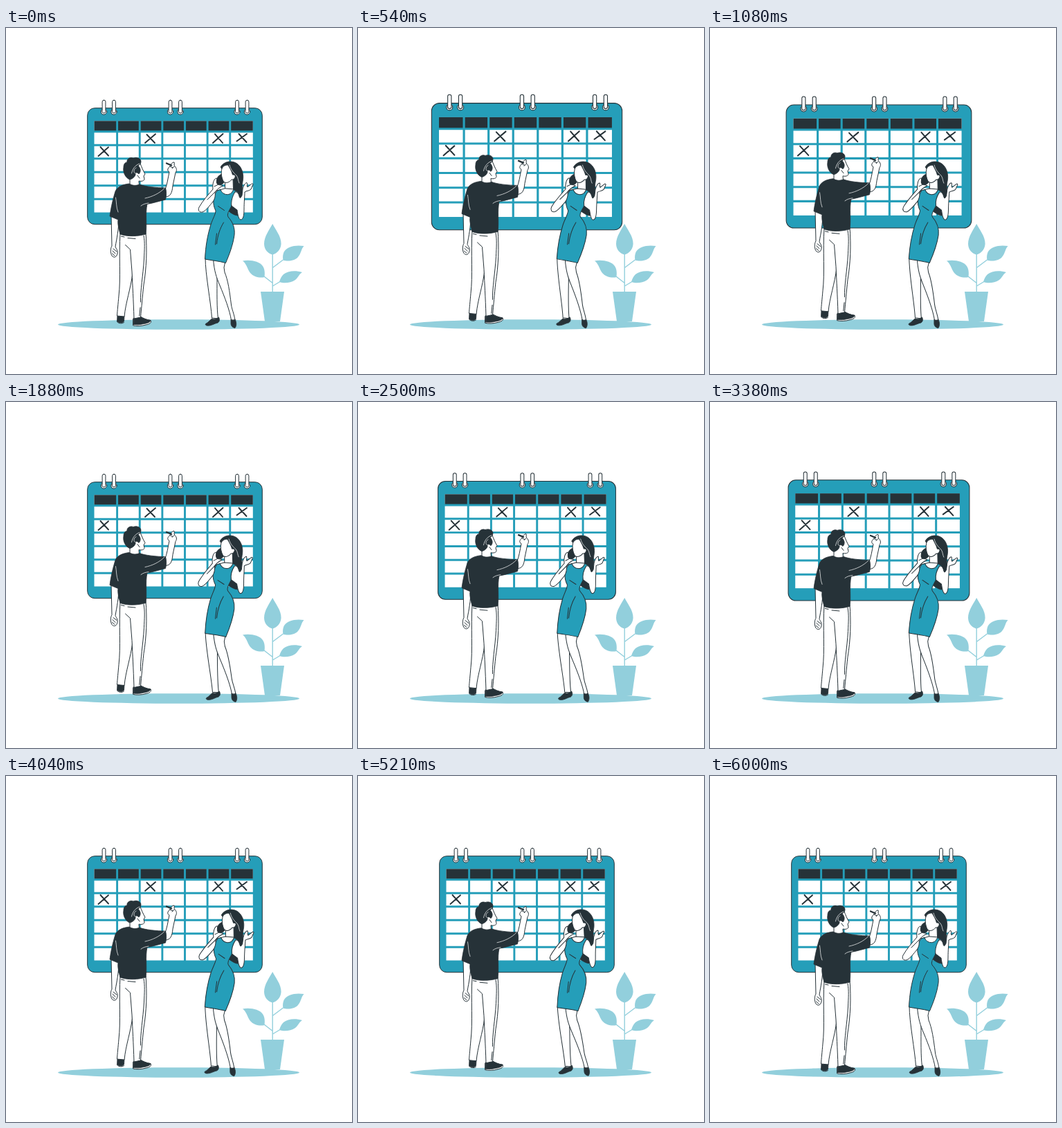
An HTML page for the animation above (6.04 s loop, 500 by 500 pixels).

```html
<!DOCTYPE html>
<html lang="en">
<head>
<meta charset="utf-8">
<title>Planning calendar</title>
<style>
  html, body { margin: 0; width: 100%; height: 100%; overflow: hidden; background: #fff; }
  svg { display: block; width: 100vw; height: 100vh; }
  .line { fill: none; stroke: #263238; stroke-width: 1; stroke-linecap: round; stroke-linejoin: round; }
  .skin { fill: #fff; stroke: #263238; stroke-width: 1; stroke-linecap: round; stroke-linejoin: round; }
  .dark { fill: #263238; stroke: #263238; stroke-width: .8; stroke-linejoin: round; }
  .teal { fill: #259eb9; stroke: #263238; stroke-width: 1; stroke-linejoin: round; }
  .light { fill: none; stroke: #fff; stroke-width: .7; stroke-linecap: round; }
  .plant { fill: #92cfdc; }
  .stem { fill: none; stroke: #92cfdc; stroke-width: 1.4; }
  .grid { fill: none; stroke: #259eb9; stroke-width: 2.9; }
  .mark { fill: none; stroke: #263238; stroke-width: 1.9; stroke-linecap: round; }
</style>
</head>
<body>
<svg viewBox="0 0 500 500">
  <ellipse class="plant" cx="249.5" cy="428.5" rx="174.5" ry="7.3"/>

  <g id="calendar">
    <rect class="teal" x="117.7" y="115.7" width="252.6" height="168" rx="10.5"/>
    <rect x="127.5" y="134.3" width="229.3" height="132.2" fill="#fff"/>
    <rect x="127.5" y="134.3" width="229.3" height="15" fill="#263238"/>
    <path id="grid" class="grid"/>
    <path class="mark" d="M201 166L216 153.300M203.500 154L215 166M299 166L313.500 153M302 153.300L313 166M333.500 163.500L348 153M336.500 153L347.500 165M133.500 185L148 172.300M136.500 172L148 184.500"/>
    <g id="rings"></g>
  </g>

  <g id="plant">
    <path class="plant" d="M368 381H402L396 424H374Z"/>
    <path class="stem" d="M385.200 382V325M400.500 335L385.200 346.500M373 359L385.200 368.500M396 366.500L385.200 373"/>
    <path class="plant" d="M385.200 283C389 291 398 301 397.600 312C397 321 391 326 385.200 327.500C379 326 373.300 321 373 312C373 301 381 291 385.200 283Z"/>
    <path class="plant" d="M430.500 315C418 313 406 316 402 323C399.500 328 400 333 400.500 335.500C406 337.500 417 337 422 331C427 325 426 320 430.500 315Z"/>
    <path class="plant" d="M342 336.500C353 334.500 366 337 371 344C374.500 349 374 356 373.500 360C367 361.500 358 360 353 354C348 347 348 341 342 336.500Z"/>
    <path class="plant" d="M428 353C418 350 407 351 401 356C397 360 396 364 395 367C401 369 411 369 418 364C423 360 423 356 428 353Z"/>
  </g>

  <g id="woman">
    <!-- hair behind the body -->
    <path class="dark" d="M310 201C315 192 327 191 334 196C342 202 344 213 342 222C340 231 344 237 341 245C338 253 339 263 335 271C331 271 326 268 322 265L327 254L326 222Z"/>
    <path class="dark" d="M304 219C306 214 310 211 313 211L316 222C312 228 306 228 304 224Z"/>
    <!-- legs -->
    <path class="skin" d="M288 332C288 356 296 396 297.500 419L306.500 420C304.500 404 305 384 305 358L304 334Z"/>
    <path class="skin" d="M299.500 334C301 352 304 360 309 372C316 389 323 407 325.500 422L331 422C329 411 326.500 407 325.500 400C323 380 321 365 316 353L315 346L317 337Z"/>
    <path class="dark" d="M297.500 420C301 422 304 420 307.500 418C309 421 309 424 306 426C301 427 296 431 290 430C287 429 288 427 291 426Z"/>
    <path class="dark" d="M325 421C327 423 329 423 331 421C333 425 333.500 430 331 433.500C327 433 325 430 325 427Z"/>
    <!-- neck and face -->
    <path class="skin" d="M316.500 221V233C320 239 326 238 328.500 234L328 216Z"/>
    <path class="skin" d="M312 203C310 210 312 218 314.500 222C318 225 323 223 326 219C329 220 332 216 331 213C329 211 328 213 327.500 212C326 206 323 202 321 198C317 198 314 199 312 203Z"/>
    <path class="light" d="M323 198C325 206 330 210 333 213C336 217 335 220 337 224"/>
    <!-- shoulders, dress -->
    <path class="skin" d="M316 232L305 235L308 243H328L334 237L328 233Z"/>
    <path class="teal" d="M305 235L310 233.500C313 242 325 244 328.500 233.500L335 237C331 244 326 251 325.500 258C322 265 319 269 321 273C328 281 331 289 330 299C328 314 322 329 317.500 339.500C307 336.500 297 336 287.500 334C288.500 315 291 300 296 284C299 275 303 269 303 264C298 254 299 244 305 235Z"/>
    <path class="line" d="M306.500 257.500L315.500 263.500M314.500 281C309 290 306 299 304.500 312M304.500 297L302.500 313"/>
    <!-- raised left arm -->
    <path class="skin" d="M313 228C309 230 304 234 302 237C303 244 301 248 299 251C294 257 289 264 284 266C279 267 277 263 279 259C284 250 293 240 299 233C298 226 300 218 304 217C306 218 303 222 305 225C308 228 311 226 313 228Z"/>
    <path class="line" d="M304 235L291 248M301 229L307 226"/>
    <!-- bent right arm -->
    <path class="skin" d="M331 237C327 243 325 251 326 257L334 263C335 270 336 276 339 277C343 277 344 270 344 262C344 252 345 243 345 237C347 235 351 236 354 233L357 226C357 224 355 225 354 226L349 230C347 228 350 225 348 223.500C345 224 343 229 342 233L341 242C339 246 338 247 337 243C336 239 334 236 331 237Z"/>
  </g>

  <g id="man">
    <!-- hanging arm -->
    <path class="skin" d="M152 270L153 315C151 318 150.500 325 153 329C156 333 160 331 161 326C162 321 159 319 158 316C160 304 163 292 163 274Z"/>
    <path class="line" d="M154 322L158 326M155 319L160 323M153.500 326L157 329"/>
    <!-- trousers and shoes -->
    <path class="dark" d="M161 415L171 416L170.500 424C168 427 163 426 160.500 424Z"/>
    <path class="line" d="M160.500 424.500C163 427.500 168 427.500 170.500 425.500"/>
    <path class="skin" d="M165 296C163 330 166 362 163 387C162 399 161 408 160.500 416L171 417C173 396 180 378 183 354L187 300Z"/>
    <path class="skin" d="M184 420L194 417C198 419 203 422 209 422.500C211 426 207 428 202 429C196 431 188 431 184 430Z"/>
    <path class="dark" d="M184.500 419L194 417C198 420 203 421.500 209 422.500C209 425 204 427 199 427.500C194 429 189 429 184 428.500Z"/>
    <path class="skin" stroke="none" d="M166 296L202 296C204 320 203 348 199 371C197 390 196 403 194.500 418L185 420C184 390 183 375 182 352L179 319L172 312L166 304Z" style="stroke:none"/>
    <path class="line" d="M202 296C204 320 203 348 199 371C197 390 196 403 194.500 418L185 420C184 390 183 375 182 352L179.500 320L172.500 313.500M199 300C201 310 200 320 199.500 334C198 358 194 379 194.500 396M194 404L192.800 416M176 303.500L187 304.500M166.500 301L171 302"/>
    <!-- head -->
    <path class="skin" d="M179 210V227C183 231 189 230 192.500 228L192 221C196 222 200 221 200 218L199 214L201 211C198 206 196 201 194 196Z"/>
    <path class="dark" d="M179 219C173 217 168.500 209 170 201C170 197 172 194 175 194C174 189 180 186 184 188C188 186 195 188 195 193C195 197 192 198 191 199C195 203 195 208 192 211C190 209 188 208 187 210C188 214 183 218 179 219Z"/>
    <path class="light" d="M193 196C187 198 183 203 181.500 210M187 210C184 210 184 204 188 202"/>
    <path class="line" d="M190 213L193 217"/>
    <!-- writing arm -->
    <path class="skin" d="M229 236C233 227 234 217 236 208C232 206 234 202 237 200C238 197 240 194 243 194C244 196 242 198 244 200C247 203 247 206 245 209L241 228C240 238 238 244 230 244Z"/>
    <path class="line" d="M237 200L241 202M243 200L240 203"/>
    <path d="M232 195.500L239 198.500" stroke="#263238" stroke-width="2.300" stroke-linecap="round"/>
    <!-- shirt -->
    <path class="dark" d="M178 225C183 228 188 228 193 226C200 229 218 231 230.500 231C232 236 232 243 230.500 248C222 250 213 253 204 254.500C201 268 204 284 202 298C191 301 176 302 165 298C163 290 161 283 162 277L150 272C152 257 155 246 158 236C161 229 169 226 178 225Z"/>
    <path class="light" d="M201 246C211 244 222 239 229 231.500M195 257C198 254.500 202 253.500 206 253M158.500 245C160 252 159 259 162 266"/>
  </g>
</svg>
<script>
  const get = id => document.getElementById(id);

  let lines = "";
  for (let i = 0; i < 6; i++) {
    lines += `M${160.6 + 32.63 * i} 134V267M127 ${149.700 + 19.5 * i}H357.500`;
  }
  get("grid").setAttribute("d", lines);

  get("rings").innerHTML = [141.5, 156, 237.5, 252, 334, 348.5].map(x =>
    `<circle class="skin" cx="${x}" cy="121" r="4.100"/>
     <rect class="skin" x="${x - 2.4}" y="104.300" width="4.800" height="18.700" rx="2.400"/>`).join("");

  // Linear interpolation through [position, value] stops.
  function track(stops, p) {
    const i = Math.max(1, stops.findIndex(s => s[0] >= p));
    const [a, from] = stops[i - 1], [b, to] = stops[i];
    return from + (to - from) * (p - a) / (b - a);
  }

  const LOOP = 6040, CYCLE = 6000;
  const beat = [[0, 1], [.1, 1.1], [.3, 1], [.4, 1], [.5, 1.1], [.6, 1], [1, 1]];
  const float = [[0, 0], [.5, -10], [1, 0]];
  const sway = [[0, 0], [.25, 1], [.75, -1], [1, 0]];

  function draw(now) {
    const p = (now % LOOP) / CYCLE % 1, half = p * 2 % 1;
    get("calendar").setAttribute("transform",
      `translate(244 194) scale(${track(beat, p)}) translate(-244 -194)`);
    get("man").setAttribute("transform", `translate(0 ${track(float, half)})`);
    get("woman").setAttribute("transform", `rotate(${track(sway, half)} 317.500 313.500)`);
  }

  let start;
  function tick(now) {
    start ??= now;
    draw(now - start);
    requestAnimationFrame(tick);
  }
  draw(0);
  requestAnimationFrame(tick);
</script>
</body>
</html>
```
